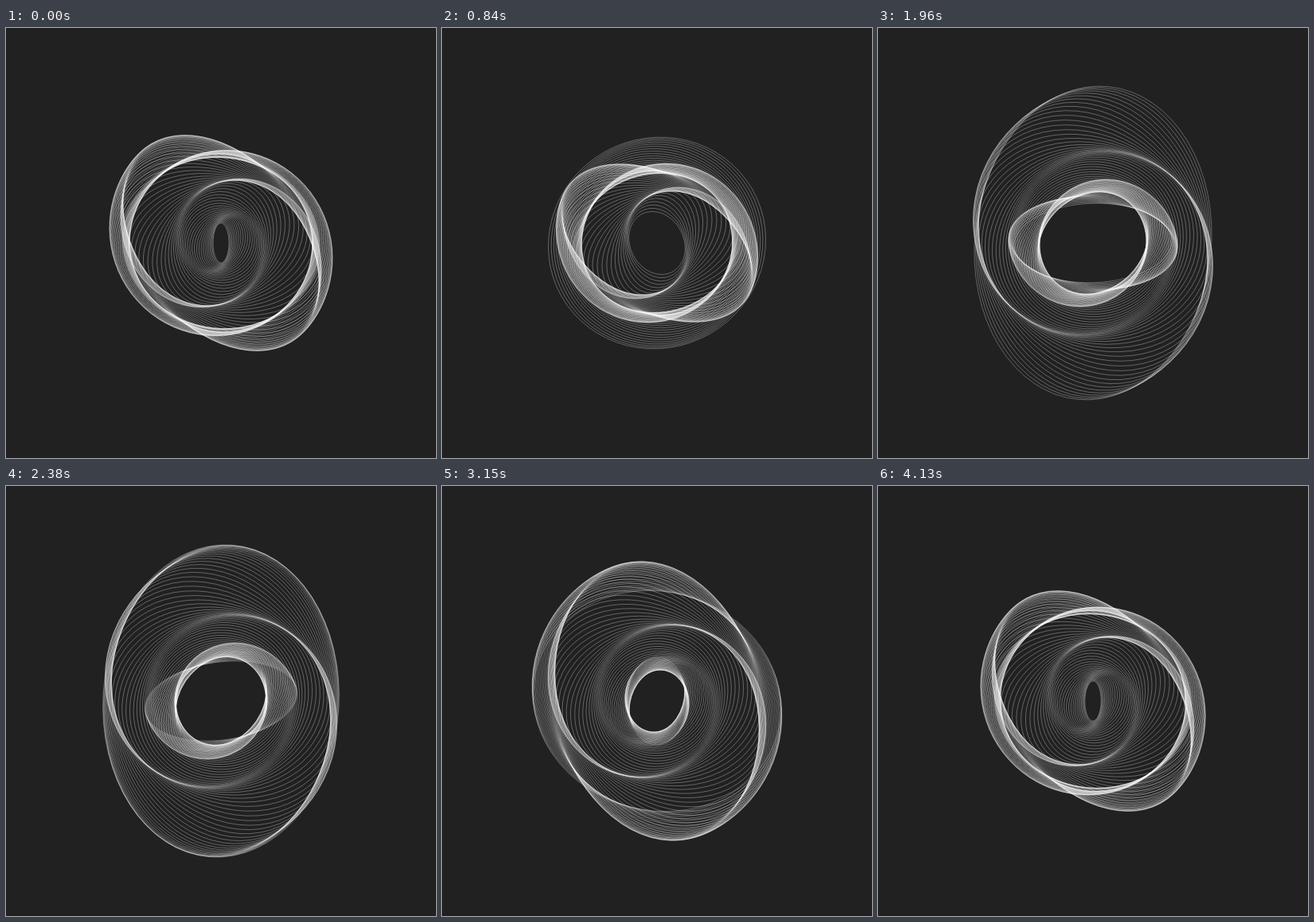
An HTML page with a canvas that plays this animation: 540x540 px, repeating every 4.2 s.

```html
<!DOCTYPE html>
<html lang="en">
<head>
<meta charset="utf-8">
<title>Breathing ellipses</title>
<style>
  html, body { margin: 0; width: 100%; height: 100%; overflow: hidden; background: #212121; }
  canvas { display: block; width: 540px; height: 540px; }
</style>
</head>
<body>
<canvas id="stage" width="540" height="540"></canvas>
<script>
  const SIZE = 540, LOOP = 4200, STEP = 70, COUNT = 100;
  const TAU = Math.PI * 2;
  const ctx = document.getElementById("stage").getContext("2d");

  // Every ring swings between a small upright pose and a wide one half a turn on;
  // each next ring is 1px larger, turned 1 degree further and ahead in phase.
  function drawRing(i, time) {
    const swing = (1 - Math.cos(TAU * (time + i / COUNT))) / 2;
    const rx = 10 + 90 * swing + i;
    const ry = 25 + 25 * swing + i;
    const tilt = Math.PI * (swing + i / 180);
    ctx.beginPath();
    ctx.ellipse(SIZE / 2, SIZE / 2, rx, ry, tilt, 0, TAU);
    ctx.stroke();
  }

  function draw(now) {
    const time = Math.floor((now % LOOP) / STEP) * STEP / LOOP;
    ctx.fillStyle = "#212121";
    ctx.fillRect(0, 0, SIZE, SIZE);
    ctx.strokeStyle = "rgba(255, 255, 255, 0.3)";
    ctx.lineWidth = 1;
    for (let i = 0; i < COUNT; i++) drawRing(i, time);
  }

  const start = performance.now();
  function tick() {
    draw(performance.now() - start);
    requestAnimationFrame(tick);
  }
  tick();
</script>
</body>
</html>
```
